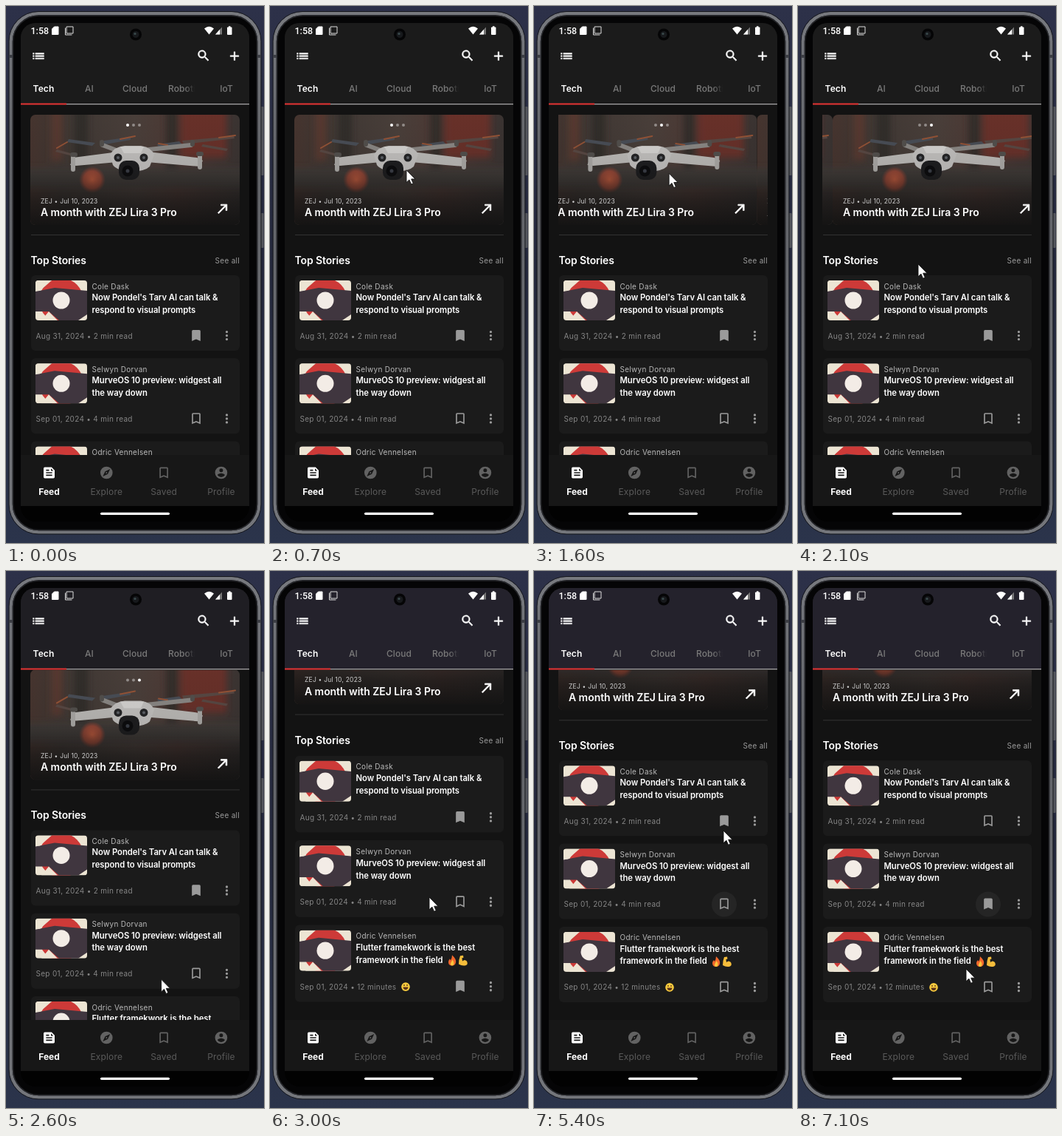
These frames come from a looping animation (350x726 px, 7200 ms). An HTML page:

```html
<!DOCTYPE html>
<html lang="en">
<head>
<meta charset="utf-8">
<title>News app</title>
<style>
  html, body { margin: 0; width: 100%; height: 100%; overflow: hidden; background: #272b40; }
  svg { display: block; width: 350px; height: 726px; font-family: Inter, sans-serif; }
  text { white-space: pre; }
</style>
</head>
<body>
<script>
const LOOP = 7200, STEP = 100;
const PAGE = 284, PITCH = 112.3, VIEW_END = 607;

const ICONS = {
  list: 'M3 13h2v-2H3zm0 4h2v-2H3zm0-8h2V7H3zm4 4h14v-2H7zm0 4h14v-2H7zM7 7v2h14V7z',
  search: 'M15.5 14h-.79l-.28-.27A6.5 6.5 0 1 0 13.73 14.43l.27.28v.79l5 4.99L20.49 19zm-6 0a4.5 4.5 0 1 1 0-9 4.5 4.5 0 0 1 0 9z',
  add: 'M19 13h-6v6h-2v-6H5v-2h6V5h2v6h6z',
  arrow: 'M9 5v2h6.59L4 18.59 5.41 20 17 8.41V15h2V5z',
  saved: 'M17 3H7a2 2 0 0 0-2 2v16l7-3 7 3V5a2 2 0 0 0-2-2z',
  save: 'M17 3H7a2 2 0 0 0-2 2v16l7-3 7 3V5a2 2 0 0 0-2-2zm0 15l-5-2.18L7 18V5h10z',
  more: 'M12 8a2 2 0 1 0 0-4 2 2 0 0 0 0 4zm0 2a2 2 0 1 0 0 4 2 2 0 0 0 0-4zm0 6a2 2 0 1 0 0 4 2 2 0 0 0 0-4z',
  feed: 'M16 3H5a2 2 0 0 0-2 2v14a2 2 0 0 0 2 2h14a2 2 0 0 0 2-2V8zM7 7h5v2H7zm10 10H7v-2h10zm0-4H7v-2h10zm-2-4V5l4 4z',
  explore: 'M12 10.9a1.1 1.1 0 1 0 0 2.2 1.1 1.1 0 0 0 0-2.2zM12 2a10 10 0 1 0 0 20 10 10 0 0 0 0-20zm2.19 12.19L6 18l3.81-8.19L18 6z',
  profile: 'M12 2a10 10 0 1 0 0 20 10 10 0 0 0 0-20zm0 3a3 3 0 1 1 0 6 3 3 0 0 1 0-6zm0 14.2a7.2 7.2 0 0 1-6-3.22c.03-1.99 4-3.08 6-3.08s5.97 1.09 6 3.08a7.2 7.2 0 0 1-6 3.22z'
};
const BOLD = 'stroke="#fff" stroke-width=".5"';

const icon = (name, cx, cy, fill, attrs = '') =>
  `<path ${attrs} d="${ICONS[name]}" fill="${fill}" fill-rule="evenodd" transform="translate(${cx - 10} ${cy - 10}) scale(.8333)"/>`;

const text = (str, x, y, size, fill, { w = 400, ls = 0, anchor = 'start', font = '' } = {}) =>
  `<text x="${x}" y="${y}" font-size="${size}" fill="${fill}" font-weight="${w}" letter-spacing="${ls}"` +
  ` text-anchor="${anchor}"${font && ` font-family="${font}, sans-serif"`}>${str}</text>`;

const rect = (x, y, w, h, fill, r = 0, more = '') =>
  `<rect x="${x}" y="${y}" width="${w}" height="${h}" rx="${r}" fill="${fill}" ${more}/>`;

const circle = (x, y, r, fill, more = '') => `<circle cx="${x}" cy="${y}" r="${r}" fill="${fill}" ${more}/>`;
const shape = (d, fill, more = '') => `<path d="${d}" fill="${fill}" ${more}/>`;
const line = (d, stroke, width) => shape(d, 'none', `stroke="${stroke}" stroke-width="${width}" stroke-linecap="round" stroke-linejoin="round"`);
const stops = list => list.map(([at, color, a = 1]) => `<stop offset="${at}" stop-color="${color}" stop-opacity="${a}"/>`).join('');

const defs = `<defs>
  <linearGradient id="desk" x2="0" y2="1">${stops([[0, '#2d3149'], [.5, '#23273b'], [1, '#2b344b']])}</linearGradient>
  <linearGradient id="rim" x2="0" y2="1">${stops([[0, '#77797e'], [.3, '#616368'], [1, '#74767b']])}</linearGradient>
  <linearGradient id="photo">${stops([[0, '#493630'], [.15, '#403834'], [.5, '#4c413c'], [.7, '#4f3a35'], [1, '#3c3533']])}</linearGradient>
  <linearGradient id="shade" x2="0" y2="1">${stops([[0, '#111', .05], [.5, '#111', .12], [.78, '#111', .65], [1, '#111', .92]])}</linearGradient>
  <radialGradient id="glow">${stops([[0, '#d0603f', .95], [.65, '#b44c36', .75], [1, '#a04030', 0]])}</radialGradient>
  <linearGradient id="fade" gradientUnits="userSpaceOnUse" x1="243" x2="256">${stops([[0, '#797979'], [1, '#797979', 0]])}</linearGradient>
  <clipPath id="screen">${rect(20, 23, 310, 674, '#000', 20)}</clipPath>
  <clipPath id="list">${rect(20, 134, 310, VIEW_END - 134, '#000')}</clipPath>
  <clipPath id="pager">${rect(33, 147, PAGE, 149, '#000')}</clipPath>
  <clipPath id="slide">${rect(0, 0, PAGE, 149, '#000', 7)}</clipPath>
  <clipPath id="round">${rect(0, 0, 70, 54, '#000', 4)}</clipPath>
  <filter id="soft"><feGaussianBlur stdDeviation="4"/></filter>
  <g id="hero" clip-path="url(#slide)">
    ${rect(0, 0, PAGE, 149, 'url(#photo)')}
    <g filter="url(#soft)">
      ${rect(28, -8, 16, 70, '#5a3a31')}${rect(60, -8, 18, 80, '#332d2a')}${rect(184, -8, 16, 80, '#352d2b')}
      ${rect(204, -8, 62, 66, '#6c332c')}${rect(-8, 72, 300, 26, '#413b38')}
    </g>
    ${circle(84, 88, 18, 'url(#glow)')}
    ${shape('M52 33L88 38L84 42L50 37ZM94 36L136 30V34L96 41ZM172 40L202 36L206 40L174 44Z', '#4b5059')}
    ${shape('M206 35L276 29L277 32L208 40ZM234 40L268 46L266 49L232 43ZM36 47L58 53V56L34 50Z', '#5b4a45')}
    ${line('M36 45L50 37M122 33L142 29M256 31L278 28M174 39L186 41', '#9a5638', 2)}
    ${line('M122 50L98 41M152 48L218 41', '#8f8c89', 6)}
    ${shape('M120 50L58 58L54 68L62 69L118 64ZM160 50L226 58L234 62L230 70L158 64Z', '#c2c0bd')}
    ${line('M58 57V74M230 56V71', '#b0aeab', 6)}
    ${line('M57 54H61M228 53H232M97 37V40M220 37V40', '#55524f', 6)}
    ${shape('M108 54Q114 43 128 42L150 42Q164 44 168 54L162 70Q156 76 138 77Q118 76 112 68Z', '#c9c7c5')}
    ${shape('M122 43H154L150 52H127Z', '#dddbd9')}
    ${circle(119, 58, 5.5, '#242426')}${circle(154, 58, 5.5, '#242426')}
    ${circle(119, 58, 2, '#61656b')}${circle(154, 58, 2, '#61656b')}
    ${rect(120, 62, 28, 26, '#1d1d1f', 10)}${circle(132, 76, 7.5, '#0b0b0d')}${circle(132, 76, 2.5, '#3b3f48')}
    ${rect(0, 0, PAGE, 149, 'url(#shade)')}
    ${text('ZEJ • Jul 10, 2023', 14, 119.5, 8.5, '#cfcfcf', { ls: .22 })}
    ${text('A month with ZEJ Lira 3 Pro', 14, 137, 14, '#fff', { w: 600, ls: -.05 })}
    ${icon('arrow', 261, 127, '#fff', 'stroke="#fff" stroke-width=".9"')}
  </g>
  <g id="thumb" clip-path="url(#round)">
    ${rect(0, 0, 70, 54, '#ece4d3')}
    ${circle(35, 27, 30, '#cd3a38')}
    ${shape('M0 15L26 10L70 14V46L58 54H32L18 42H0Z', '#40363f')}
    ${shape('M0 0H22L6 14H0ZM8 54L18 42L30 54Z', '#ece4d3')}
    ${circle(35, 27, 11.5, '#f3ece6')}
  </g>
</defs>`;

const stories = [
  ['Cole Dask', 'Now Pondel\'s Tarv AI can talk &amp;', 'respond to visual prompts', 'Aug 31, 2024 • 2 min read'],
  ['Selwyn Dorvan', 'MurveOS 10 preview: widgest all', 'the way down', 'Sep 01, 2024 • 4 min read'],
  ['Odric Vennelsen', 'Flutter framekwork is the best', 'framework in the field', 'Sep 01, 2024 • 12 minutes']
];

const emoji = `
  ${shape('M247 40C250 43 253 46 252 50Q251 54 247 54Q242 54 242 49Q242 47 244 45L245 47Q247 44 247 40Z', '#f2682c')}
  ${shape('M247.500 46Q250 49 249.500 51.500Q249 54 247 54Q244.500 53.500 245 51Q246 49 247.500 46Z', '#fbc63c')}
  ${shape('M258 41L262 40.500L262.500 43.500L260.500 44L261 48Q264 45 267 48Q269 52 266 53.500Q261 55 256 52Q256 46 258 41Z', '#f5bd3b')}
  ${circle(184, 82, 5.8, '#f9cb3e')}${shape('M180.500 82.500H187.500Q187 86 184 86Q181 86 180.500 82.500Z', '#5b3218')}
  ${circle(182, 80, .9, '#5b3218')}${circle(186, 80, .9, '#5b3218')}`;

const headline = { w: 600, ls: -.05 };
const story = ([author, first, second, date], i) => `<g transform="translate(0 ${364 + i * PITCH})">
  ${rect(34, 0, 283, 102, '#1b1b1b', 6)}
  <use href="#thumb" x="40" y="7"/>
  ${text(author, 116.5, 18.5, 10, '#b9b9b9', { ls: .3 })}
  ${text(first, 116.5, 34, 11.3, '#fff', headline)}
  ${text(second, 116.5, 50.5, 11.3, '#fff', headline)}
  ${text(date, 40.5, 85.5, 10, '#858585', { ls: .3 })}
  ${i === 1 ? circle(258, 82, 17, '#252525', 'id="focus"') : ''}
  ${icon('save', 258, 81.4, '#9a9a9a', `id="mark${i}"`)}
  ${icon('more', 299.500, 81.6, '#9a9a9a')}
  ${i === 2 ? emoji : ''}
</g>`;

const mid = { anchor: 'middle', w: 500, ls: .1 };
const tabs = ['Tech', 'AI', 'Cloud', '', 'IoT'].map((s, i) =>
  text(s, 51 + i * 62, 116, 12, i ? '#797979' : '#fff', { ...mid, w: i ? 500 : 600 })).join('');

const nav = [['feed', 'Feed'], ['explore', 'Explore'], ['save', 'Saved'], ['profile', 'Profile']].map(([name, label], i) => {
  const x = 58.5 + i * 77.8, on = i === 0;
  return icon(name, x, 631, on ? '#fff' : '#626262') +
    text(label, x, 661.3, 12, on ? '#fff' : '#5a5a5a', { ...mid, w: on ? 700 : 400, ls: on ? 0 : .15 });
}).join('');

const statusBar = `
  ${text('1:58', 33.5, 37.6, 12.5, '#fff', { w: 500, font: 'Roboto' })}
  ${shape('M65.500 28H71V38.500H62.500V31Z', '#fff', 'stroke="#fff" stroke-linejoin="round"')}
  ${line('M82.500 28H91V37H82.500ZM80.500 30V39H89', '#ddd', 1)}
  ${shape('M269 30.500Q275.500 25 282 30.500L275.500 38.500Z', '#fff')}
  ${shape('M284 38.500L293 28.500V38.500Z', '#777')}${shape('M284 38.500L290 31.800V38.500Z', '#fff')}
  ${rect(300, 28.500, 6.500, 10.500, '#fff', 1)}${rect(302, 27.300, 2.500, 2, '#fff')}
  ${circle(176, 38.5, 8, '#050506')}${circle(176, 38.5, 4.5, '#17191c')}${circle(175, 37.5, 1.6, '#3a4a4c')}`;

document.body.innerHTML = `<svg viewBox="0 0 350 726">${defs}
  ${rect(0, 0, 350, 726, 'url(#desk)')}
  ${rect(345, 136, 4.5, 93, '#55575d', 1)}${rect(345, 280, 4.5, 47, '#55575d', 1)}
  ${rect(6.5, 10, 337, 701.5, '#050506', 38, 'stroke="url(#rim)" stroke-width="4.500"')}
  ${rect(4, 7.5, 342, 706.5, 'none', 40, 'stroke="#17181d" stroke-width="1"')}
  ${rect(9.5, 13, 331, 695.5, 'none', 35, 'stroke="#26272b" stroke-width="1.500"')}
  ${rect(4, 66, 5, 4, '#3c3e44')}${rect(341, 66, 5, 4, '#3c3e44')}
  <g clip-path="url(#screen)">
    ${rect(20, 23, 310, 653, '#131313')}
    <g clip-path="url(#list)"><g id="content">
      <g clip-path="url(#pager)">
        <g id="slides">${[0, 1, 2].map(i => `<use href="#hero" x="${33 + i * PAGE}" y="147"/>`).join('')}</g>
        ${[0, 1, 2].map(i => circle(165 + i * 8, 161, 2, '#fff', `id="dot${i}"`)).join('')}
      </g>
      ${rect(34, 309, 283, 1, '#323232')}
      ${text('Top Stories', 33.5, 348.6, 14, '#fff', { w: 600, ls: -.12 })}
      ${text('See all', 317, 347.6, 10, '#9a9a9a', { ls: .3, anchor: 'end' })}
      ${stories.map(story).join('')}
    </g></g>
    ${rect(20, 23, 310, 110, '#1b1b1b')}
    ${rect(20, 23, 310, 110, '#24222c', 0, 'id="tint"')}
    ${rect(82, 132, 248, 1.300, '#a3a1a3')}${rect(20, 131.5, 62, 2, '#e53434')}
    ${statusBar}
    ${icon('list', 44, 67.7, '#fff', BOLD)}${icon('search', 268, 67.2, '#fff', BOLD)}${icon('add', 310, 67.7, '#fff', BOLD)}
    ${tabs}${text('Robotics', 220, 116, 12, 'url(#fade)', { w: 500, ls: .1 })}
    ${rect(20, VIEW_END, 310, 69, '#171717')}${nav}
    ${rect(20, 676, 310, 21, '#020202')}${rect(128, 684.700, 94, 3.200, '#fff', 1.6)}
  </g>
  ${shape('M0 0V16.800L3.900 13.200L6.600 19.300L9.300 18.100L6.700 12.200H12Z', '#fff', 'id="cursor" stroke="#111" stroke-width=".9" stroke-linejoin="round"')}
</svg>`;

// Each row is a time followed by the values held at that time.
const CURSOR = [
  [250, 350, 320], [650, 185, 222], [800, 185, 221], [1100, 48, 220], [1200, 40, 221], [1450, 195, 225],
  [1550, 198, 226], [1800, 55, 229], [2100, 163, 349], [2400, 208, 560], [2500, 210, 565], [3000, 216, 441],
  [3200, 216, 440], [3600, 260, 450], [3800, 260, 452], [4100, 281, 540], [4350, 262, 562], [4600, 260, 562],
  [4850, 260, 450], [5050, 260, 450], [5400, 257, 351], [5500, 257, 340], [5700, 257, 340], [6050, 259, 450],
  [6350, 259, 450], [7100, 228, 538]
];
const SWIPE = [[800, 0], [1100, 124], [1450, PAGE], [1550, PAGE], [1800, 425], [2100, 554], [2300, 568]];
const SCROLL = [[2500, 0], [2950, 107.7]];
const STRETCH = [[2850, 1], [3000, 1.019], [3100, 1.019], [3400, 1]];
const TINT = [[2500, 0], [2700, 1]];
const SAVED = [t => t < 5650, t => (t >= 3700 && t < 4950) || t >= 6150, t => t < 4450];

function track(rows, t) {
  const next = rows.findIndex(r => r[0] > t);
  if (next === 0) return rows[0].slice(1);
  if (next < 0) return rows[rows.length - 1].slice(1);
  const a = rows[next - 1], b = rows[next];
  const p = (t - a[0]) / (b[0] - a[0]), e = p * p * (3 - 2 * p);
  return a.slice(1).map((v, i) => v + (b[i + 1] - v) * e);
}

const set = (id, name, value) => document.getElementById(id).setAttribute(name, value);

function draw(t) {
  const [swipe] = track(SWIPE, t), [scroll] = track(SCROLL, t), [stretch] = track(STRETCH, t);
  const [x, y] = track(CURSOR, t), page = Math.round(swipe / PAGE);
  set('slides', 'transform', `translate(${-swipe} 0)`);
  set('content', 'transform', `translate(0 ${VIEW_END}) scale(1 ${stretch}) translate(0 ${-VIEW_END - scroll})`);
  set('tint', 'opacity', track(TINT, t)[0]);
  set('focus', 'opacity', t >= 3700 ? 1 : 0);
  set('cursor', 'transform', `translate(${x} ${y})`);
  set('cursor', 'opacity', t >= 250 ? 1 : 0);
  SAVED.forEach((isSaved, i) => {
    set('mark' + i, 'd', ICONS[isSaved(t) ? 'saved' : 'save']);
    set('dot' + i, 'opacity', i === page ? 1 : .4);
  });
}

const start = performance.now();
function tick() {
  const t = (performance.now() - start) % LOOP;
  draw(Math.floor(t / STEP) * STEP);
  requestAnimationFrame(tick);
}
tick();
</script>
</body>
</html>
```
